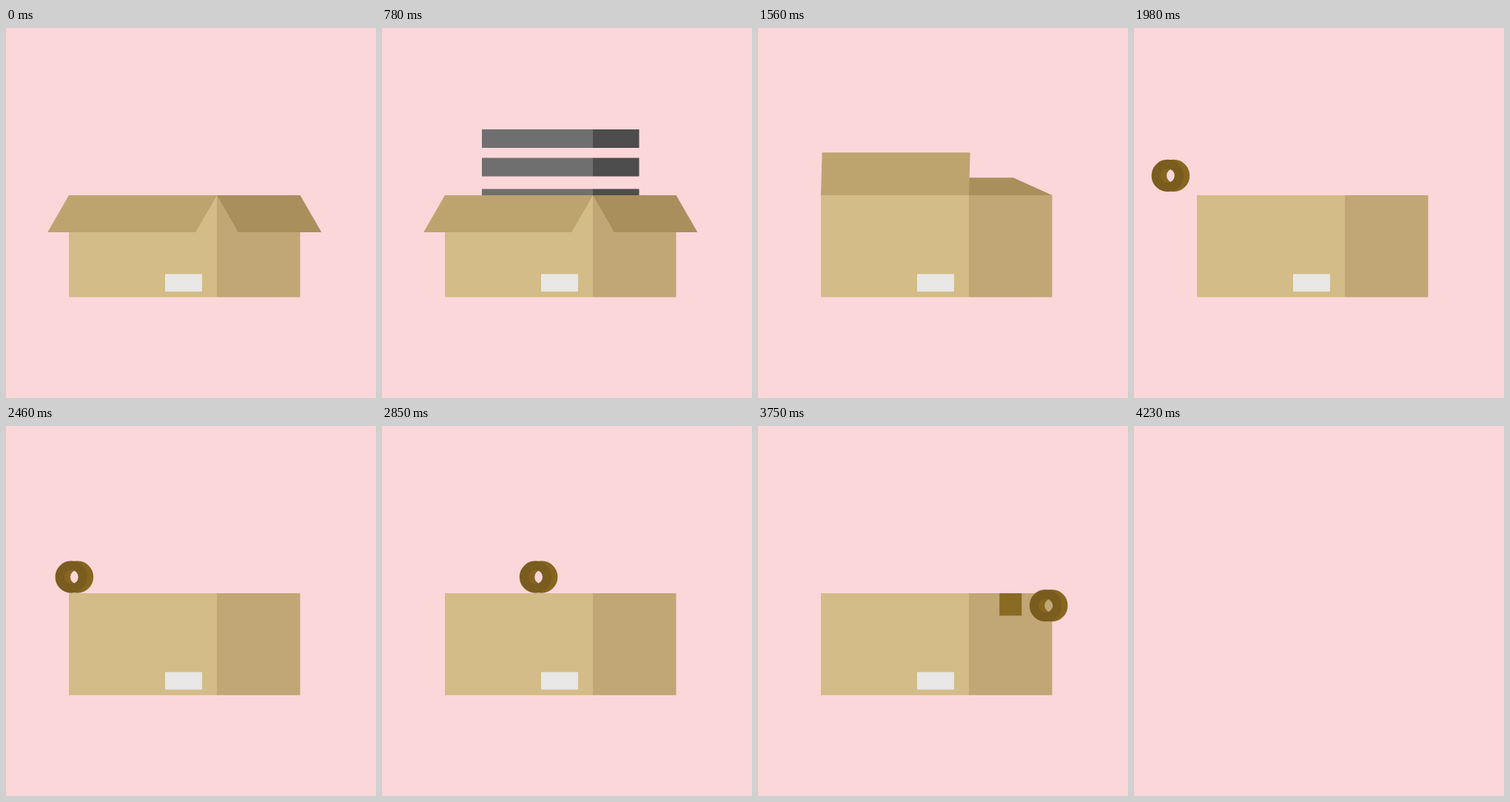
Write an HTML page that moves like this. It is 500 by 500 pixels and loops after 4260 ms.

```html
<!DOCTYPE html>
<html lang="en">
<head>
<meta charset="utf-8">
<title>Packing a box</title>
<style>
html, body { margin: 0; width: 100%; height: 100%; overflow: hidden; background: #fbd7da; }
svg { display: block; width: 100vw; height: 100vh; }
</style>
</head>
<body>
<svg viewBox="0 0 500 500">
  <rect width="500" height="500" fill="#fbd7da"/>
  <g id="scene">
    <g class="bar"><path d="M135 0h150v25h-150z" fill="#706f6f"/><path d="M285 0h62.5v25h-62.5z" fill="#4d4d4d"/></g>
    <g class="bar"><path d="M135 0h150v25h-150z" fill="#706f6f"/><path d="M285 0h62.5v25h-62.5z" fill="#4d4d4d"/></g>
    <g class="bar"><path d="M135 0h150v25h-150z" fill="#706f6f"/><path d="M285 0h62.5v25h-62.5z" fill="#4d4d4d"/></g>
    <rect x="85" y="226" width="200" height="137.7" fill="#d3bc87"/>
    <rect x="285" y="226" width="112.5" height="137.7" fill="#c0a775"/>
    <rect x="215" y="332.5" width="50" height="23.7" fill="#e8e7e5"/>
    <path id="sideFlap" fill="#a98f5c"/>
    <path id="frontFlap" fill="#bda46f"/>
    <rect id="strip" x="326.3" y="226" width="30" height="0" fill="#8a6b24"/>
    <g id="roll" fill="none" stroke-width="12.2">
      <circle cx="4.1" r="15.6" stroke="#86661f"/>
      <circle cx="-4.1" r="15.6" stroke="#7a5c1e"/>
    </g>
  </g>
</svg>
<script>
const LOOP = 4260, STEP = 30, TOP = 226, FLAP = 57.7;
const $ = id => document.getElementById(id);
const bars = document.querySelectorAll('.bar');

const progress = (t, start, length) => Math.min(1, Math.max(0, (t - start) / length));
const cubic = u => u < .5 ? 4 * u ** 3 : 1 - 4 * (1 - u) ** 3;
const smooth = u => u * u * (3 - 2 * u);

// constant speed with short ramps of length r at both ends
function cruise(u, r) {
  const v = 1 / (1 - r);
  if (u < r) return v * u * u / (2 * r);
  if (u > 1 - r) return 1 - v * (1 - u) ** 2 / (2 * r);
  return v * (u - r / 2);
}

function fold(flap, x1, x2, side, turn) {
  const a = (60 - 240 * turn) * Math.PI / 180;
  const dx = side * FLAP * Math.cos(a), y = TOP + FLAP * Math.sin(a);
  flap.setAttribute('d', `M${x1} ${TOP}H${x2}L${x2 + dx} ${y}H${x1 + dx}Z`);
}

function rollAt(t) {
  const enter = cubic(progress(t, 1364, 1000));
  const run = cruise(progress(t, 2385, 940), .128);
  const down = smooth(progress(t, 3320, 165));
  const leave = cubic(progress(t, 3480, 674));
  return {
    x: -72 + 157 * enter + 256.3 * run + 200 * leave,
    y: 184 + 20 * enter + 52 * down - 52 * leave,
    low: 204 + 52 * down
  };
}

function draw(t) {
  $('scene').setAttribute('visibility', t < 4230 ? 'visible' : 'hidden');
  bars.forEach((bar, i) => {
    const u = progress(t, 670 - 67 * i, 360);
    bar.setAttribute('transform', `translate(0 ${124.7 + 107 * cubic(u)})`);
    bar.setAttribute('opacity', u < 1 ? Math.min(1, u * 4) : 0);
  });
  fold($('sideFlap'), 285, 397.5, 1, cubic(progress(t, 833, 1030)));
  fold($('frontFlap'), 85, 285, -1, cubic(progress(t, 995, 1030)));

  const { x, y, low } = rollAt(t);
  $('roll').setAttribute('transform', `translate(${x} ${y})`);
  $('strip').setAttribute('height', Math.max(0, low + .3 - TOP));
}

const begin = performance.now();
function tick() {
  const t = (performance.now() - begin) % LOOP;
  draw(Math.floor(t / STEP) * STEP);
  requestAnimationFrame(tick);
}
tick();
</script>
</body>
</html>
```
